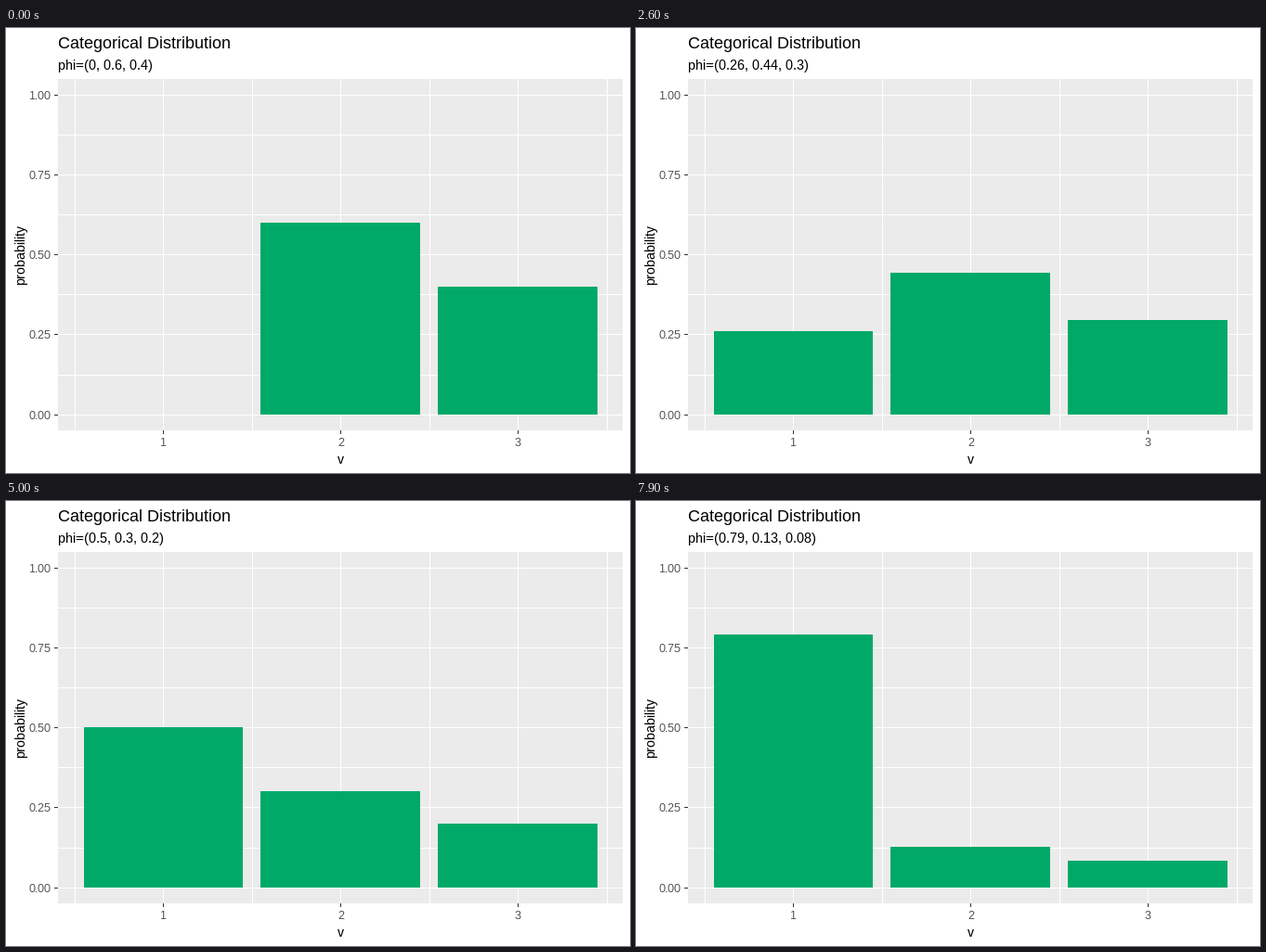
These frames come from a looping animation (672 by 480 pixels, 8 s). A matplotlib script:

```python
import matplotlib.pyplot as plt
from matplotlib.animation import FuncAnimation
from matplotlib.patches import Rectangle

plt.rcParams.update({
    "font.family": "Liberation Sans",
    "text.hinting": "native",
    "text.hinting_factor": 1,
    "text.kerning_factor": 10,
    "toolbar": "None",
})

W, H, DPI = 672, 480, 96
FRAMES, INTERVAL = 80, 100
LEFT, RIGHT, TOP, BOTTOM = 56, 664, 55, 434
PANEL, TICK, LABEL, GREEN = "#EBEBEB", "#333333", "#4D4D4D", "#00A968"

fig = plt.figure(figsize=(W / DPI, H / DPI), dpi=DPI, facecolor="white")
ax = fig.add_axes([0, 0, 1, 1])
ax.set_xlim(0, W)
ax.set_ylim(H, 0)
ax.axis("off")


def px(v):
    return 55.9 + (v - 0.405) * 190.83


def py(p):
    return 416.6 - 344.5 * p


def box(x0, y0, x1, y1, color, z=1):
    r = Rectangle((x0, y0), x1 - x0, y1 - y0, facecolor=color,
                  linewidth=0, antialiased=False, zorder=z)
    return ax.add_patch(r)


def label(x, y, s, size, color="black", **kw):
    """Text with its baseline at y, size in pixels."""
    return ax.text(x, y, s, fontsize=size * 72 / DPI, color=color,
                   va="baseline", zorder=5, **kw)


# Panel, grid and ticks
box(LEFT, TOP, RIGHT, BOTTOM, PANEL, 0)
for k in range(9):
    y = round(py(k / 8))
    box(LEFT, y, RIGHT, y + 1, "white")
    if k % 2 == 0:
        box(52, y, LEFT, y + 1, TICK)
        label(25, round(py(k / 8) + 5), f"{k / 8:.2f}", 12, LABEL)
for k in range(1, 8):
    x = round(px(k / 2))
    box(x, TOP, x + 1, BOTTOM, "white")
    if k % 2 == 0:
        box(x, BOTTOM, x + 1, BOTTOM + 4, TICK)
        label(round(px(k / 2) - 3.5), 451, str(k // 2), 12, LABEL)

# Titles
label(LEFT, 22, "Categorical Distribution", 18)
subtitle = label(LEFT, 45, "", 15)
label(round(px(2) - 3.5), 470, "v", 15)
label(20, 244.5, "probability", 15, rotation=90, ha="center",
      rotation_mode="anchor")

BASE = round(py(0))
bars = [box(round(px(v - 0.45)), BASE, round(px(v + 0.45)), BASE, GREEN, 2)
        for v in (1, 2, 3)]


def update(i):
    p = i / 100
    phi = (p, 0.6 * (1 - p), 0.4 * (1 - p))
    for bar, q in zip(bars, phi):
        top = round(py(q))
        bar.set_y(top)
        bar.set_height(BASE - top)
        bar.set_visible(top < BASE)
    subtitle.set_text("phi=(" + ", ".join(f"{round(q, 2):g}" for q in phi) + ")")
    return [*bars, subtitle]


anim = FuncAnimation(fig, update, frames=FRAMES, interval=INTERVAL,
                     repeat=True, repeat_delay=0, blit=False)
plt.show()
```
